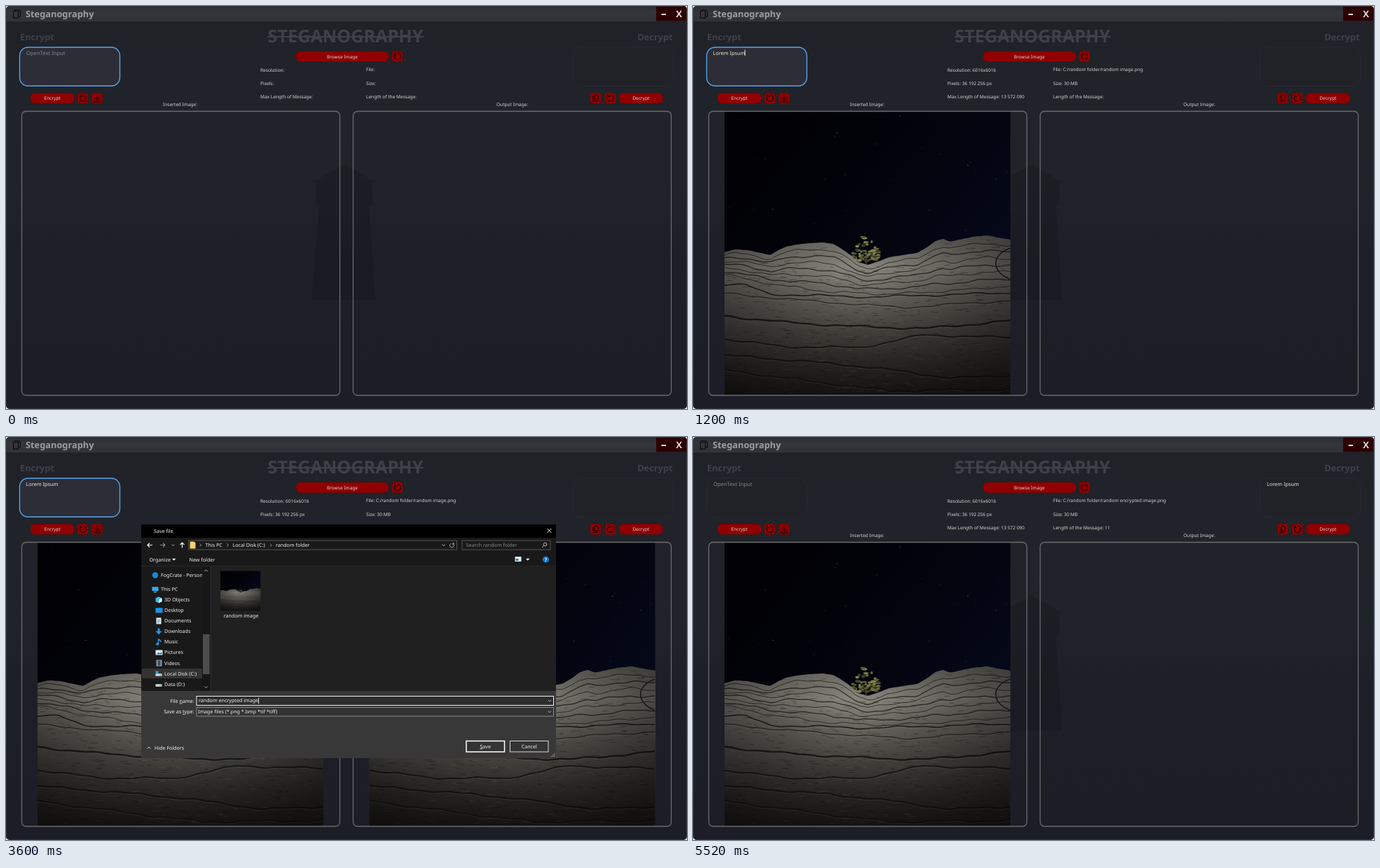
An HTML page that plays this animation: 972x576 px, repeating every 6 s.

```html
<!DOCTYPE html>
<html lang="en">
<head>
<meta charset="utf-8">
<title>Steganography</title>
<style>
  html, body { margin: 0; width: 100%; height: 100%; overflow: hidden; background: #fff; }
  svg { display: block; }
  text { font-family: "Noto Sans", "Open Sans", sans-serif; text-rendering: geometricPrecision; white-space: pre; }
</style>
</head>
<body>
<svg id="stage" xmlns="http://www.w3.org/2000/svg" width="972" height="576" viewBox="0 0 972 576"></svg>
<script>
const STEP = 1200, STEPS = 5;

let seed = 11;
const rnd = () => (seed = (seed * 16807) % 2147483647) / 2147483647;
const span = (a, b) => a + (b - a) * rnd();
const n1 = v => v.toFixed(1);

// ---- markup helpers ----
const rect = (x, y, w, h, fill, extra = '') =>
  `<rect x="${x}" y="${y}" width="${w}" height="${h}" fill="${fill}" ${extra}/>`;
const path = (d, stroke, w = 1, extra = '') =>
  `<path d="${d}" fill="none" stroke="${stroke}" stroke-width="${w}" ${extra}/>`;
const shape = (d, fill, extra = '') => `<path d="${d}" fill="${fill}" ${extra}/>`;
const text = (x, y, str, size, fill, extra = '') =>
  `<text x="${x}" y="${y}" font-size="${size}" fill="${fill}" ${extra}>${str}</text>`;
const bold = (x, y, str, size, fill, extra = '') =>
  text(x, y, str, size, fill, 'font-weight="700" ' + extra);
const at = (x, y, body) => `<g transform="translate(${x} ${y})">${body}</g>`;
const during = (steps, body) => `<g data-on="${steps}">${body}</g>`;
const grad = (id, stops, dir = 'x1="0" y1="0" x2="0" y2="1"') =>
  `<linearGradient id="${id}" ${dir}>` +
  stops.map(([o, c]) => `<stop offset="${o}" stop-color="${c}"/>`).join('') + '</linearGradient>';

// ---- night landscape ----
const ridge = [[45,352],[60,348],[78,349],[96,353],[110,356],[122,349],[133,344],[148,341],
  [165,339],[185,338],[200,340],[212,347],[225,356],[235,366],[250,370],[265,365],[280,359],
  [300,356],[320,353],[334,345],[346,336],[357,333],[367,337],[385,333],[400,330],[420,328],
  [440,332],[453,334]];
const floorLine = [[45,384],[75,390],[120,399],[200,409],[280,412],[370,407],[453,400]];

function height(points, x) {
  let i = 1;
  while (i < points.length - 1 && points[i][0] < x) i++;
  const [x0, y0] = points[i - 1], [x1, y1] = points[i];
  return y0 + (y1 - y0) * (x - x0) / (x1 - x0);
}

function trace(fn, step = 6) {
  let d = '';
  for (let x = 45; x <= 453; x += step) d += (d ? 'L' : 'M') + x + ' ' + n1(fn(x));
  return d;
}

function crack(fn, w, dark) {
  const d = trace(fn);
  return `<g transform="translate(0 2)">${path(d, '#aaa79c', 1, 'opacity=".13"')}</g>` +
    path(d, '#11110f', w, `opacity="${dark}"`);
}

function strata() {
  let out = '';
  [.14, .28, .42, .56, .7, .85, 1].forEach((u, i) => {
    out += crack(x => {
      const top = height(ridge, x), base = height(floorLine, x);
      return top + (base - top) * u + 1.3 * Math.sin(x / 13 + i * 2.1) + .7 * Math.sin(x / 5 + i);
    }, i % 2 ? 1.5 : 1, .65);
  });
  const deep = [
    [[45,398],[75,399],[110,412],[250,416],[453,410]],
    [[45,411],[160,421],[300,431],[453,421]],
    [[45,443],[130,452],[230,458],[330,461],[453,450]],
    [[45,476],[130,487],[240,488],[330,470],[453,474]],
    [[45,499],[150,507],[250,516],[370,532],[453,528]],
    [[45,520],[150,534],[280,550],[453,548]]
  ];
  deep.forEach((pts, i) => {
    out += crack(x => height(pts, x) + 1.2 * Math.sin(x / 17 + i * 1.7) + .6 * Math.sin(x / 6 + i),
      [1.6, 1, 2.4, 1.8, 2, 1.4][i], .8);
  });
  return out;
}

function grain(count, rise) {
  let d = '';
  for (let i = 0; i < count; i++) {
    const x = span(45, 445), top = height(ridge, x) + 5, y = span(top, 554);
    d += `M${n1(x)} ${n1(y)}l${n1(span(3, 12))} ${n1(span(-1, rise))}`;
  }
  return d;
}

function tree() {
  let out = path('M247 371V350', '#3a3722', 2);
  const tones = ['#3d4024', '#575a31', '#72733f', '#85854d'];
  for (let i = 0; i < 70; i++) {
    const v = Math.sqrt(rnd()), y = 327 + v * 37;
    const half = 3 + 16 * Math.sin(Math.min(1, v * 1.15) * 1.7);
    out += `<ellipse cx="${n1(247 + span(-half, half))}" cy="${n1(y)}" rx="${n1(span(1.5, 4))}" ry="${n1(span(1, 2.2))}" fill="${tones[i % 4]}"/>`;
  }
  return out;
}

function stars() {
  let out = '';
  for (let i = 0; i < 46; i++)
    out += `<circle cx="${n1(span(46, 452))}" cy="${n1(span(153, 325))}" r="${n1(span(.3, .7))}" fill="#9aa3bd" opacity="${n1(span(.2, .6))}"/>`;
  return out;
}

function photo() {
  const land = trace(x => height(ridge, x), 3) + 'L453 556H45Z';
  return rect(45, 151, 408, 405, 'url(#sky)') + stars() + tree() +
    shape(land, 'url(#rock)') +
    `<clipPath id="land"><path d="${land}"/></clipPath><g clip-path="url(#land)">` +
    path(grain(420, 1.6), '#0d0d0b', .8, 'opacity=".4"') +
    path(grain(260, 1.6), '#b5b2a6', .7, 'opacity=".16"') +
    strata() +
    path('M453 391Q428 380 433 362Q438 351 453 346', '#11110f', 1.6, 'opacity=".8"') +
    shape(land, 'url(#shade)') + '</g>';
}

// ---- application window ----
const RED = '#910000', SOFT = '#d9d7d5', DIM = '#3e404a';
const SMALL = 6.55;
const label = (x, y, str) => text(x, y + 2.4, str, SMALL, SOFT);
const pill = (x, y, w, h, str) =>
  rect(x, y, w, h, RED, 'rx="6.5" stroke="#7a0000" stroke-width=".6"') +
  text(x + w / 2, y + h / 2 + 2.4, str, SMALL, SOFT, 'text-anchor="middle"');
const icons = {
  reset: path('M4.6 4.2A4.6 4.6 0 1 0 8 2.9M4 2.2V5H7', '#160000', 1.2),
  save: path('M7.5 2.5V9.5M4.5 7L7.5 10L10.5 7M3 10.5V12.5H12V10.5', '#160000', 1.2),
  copy: path('M6 3.2H9.6L11.4 5V10H6ZM6 5H4V12.2H9.4V10', '#160000', 1.1)
};
const iconButton = (x, y, kind) =>
  at(x, y, rect(0, 0, 15, 15, RED, 'rx="3.5" stroke="#7a0000" stroke-width=".6"') + icons[kind]);
const panel = x => rect(x, 150.5, 454, 406, 'none', 'rx="6" stroke="#6b6b6c" stroke-width="1.3"');
const faintBox = x => rect(x, 58.5, 143, 56, '#202228', 'rx="12" stroke="#262930"');

function backdrop() {
  return rect(0, 0, 972, 576, 'url(#body)') +
    shape('M483 226L528 252H523V285H518L527 420H436L447 285H442V252H437Z', '#17181e', 'opacity=".45"') +
    rect(0, 0, 972, 21.5, 'url(#bar)') +
    path('M0 21.5H972', '#3b3c42', .8) +
    rect(928, 0, 44, 21.5, '#2b0102') +
    rect(935.5, 11, 6.5, 2, '#e8dcdc') +
    bold(960.5, 16, 'X', 13, '#e8dcdc', 'text-anchor="middle"') +
    path('M12.5 7.5V5.5H18L20.5 8V15H18M10.5 7.5H17.5V17.2H10.5Z', '#0b0b0d', 1.2) +
    bold(28, 15.7, 'Steganography', 12.8, '#9c9da3');
}

function controls() {
  return bold(20, 48.5, 'Encrypt', 12.8, DIM) +
    bold(951.5, 48.5, 'Decrypt', 12.8, DIM, 'text-anchor="end"') +
    bold(484.5, 52.4, 'STEGANOGRAPHY', 25.2, DIM, 'text-anchor="middle"') +
    rect(373, 43, 223, 2, DIM) +
    pill(414, 65, 132, 14.5, 'Browse Image') + iconButton(551, 64.5, 'reset') +
    pill(35, 124.5, 62.5, 14.5, 'Encrypt') + iconButton(102, 124.3, 'reset') + iconButton(122.5, 124.3, 'save') +
    iconButton(834, 124.3, 'copy') + iconButton(855, 124.3, 'reset') + pill(875, 124.5, 62.5, 14.5, 'Decrypt') +
    label(224, 140.7, 'Inserted Image:') + label(700, 140.7, 'Output Image:');
}

function details() {
  const rows = [
    [363, 92, 'Resolution:', '6016x6016'], [363, 111, 'Pixels:', '36 192 256 px'],
    [363, 130, 'Max Length of Message:', '13 572 090'], [514, 111, 'Size:', '30 MB']
  ];
  const file = name => label(514, 91, `File: C:/random folder/${name}.png`);
  const count = 'Length of the Message:';
  return rows.map(([x, y, k, v]) =>
      during('0', label(x, y, k)) + during('1234', label(x, y, k + ' ' + v))).join('') +
    during('0', label(514, 91, 'File:')) +
    during('123', file('random image')) + during('4', file('random encrypted image')) +
    during('01', label(514, 130, count)) + during('234', label(514, 130, count + ' 11'));
}

function inputs() {
  const hint = text(29, 69.5, 'OpenText Input', 7.6, '#85858b');
  const lorem = x => text(x, 69.5, 'Lorem Ipsum', 7.3, '#efe9d6');
  return during('4', faintBox(19.5)) + faintBox(809.5) +
    during('0123', rect(19.5, 59, 143, 55.3, '#2c2d37', 'rx="12" stroke="#58a2ea" stroke-width="1.4"')) +
    during('04', hint) + during('123', lorem(28.5)) +
    during('1', rect(73.7, 62.5, .9, 8.5, '#fff')) + during('4', lorem(819));
}

// ---- save dialog ----
const WHITE = '#f2f2f2', UI = 7.15;
const ui = (x, y, str, extra = '', fill = WHITE) => text(x, y + 2.6, str, UI, fill, extra);
const chevron = (x, y, s = 2.2, c = '#c4c4c4', flip = 1) =>
  path(`M${x - s} ${y - flip * s / 2}L${x} ${y + flip * s / 2}L${x + s} ${y - flip * s / 2}`, c, .9);
const caretRight = (x, y) => path(`M${x - 1} ${y - 2}l2 2l-2 2`, '#c4c4c4', .8);
const key = (str, i) =>
  `${str.slice(0, i)}<tspan text-decoration="underline">${str[i]}</tspan>${str.slice(i + 1)}`;

function folderTree() {
  const disk = rect(0, 4.5, 9, 3.5, '#d5d9dc') + rect(6, 5.8, 2, 1, '#2aa84a');
  const marks = [
    rect(0, 1, 9, 6, '#38a8ee') + rect(2.5, 8, 4, 1, '#9cc9e6'),
    shape('M4.5 0L9 2V7L4.5 9L0 7V2Z', '#42b9ea') + shape('M4.5 4L9 2V7L4.5 9Z', '#dff3fb'),
    rect(0, 1, 10, 7, '#1595ef'),
    rect(1, 0, 7, 9, '#e8edf1') + path('M2.5 3H6.5M2.5 5H6.5M2.5 7H5', '#3784c4', .9),
    shape('M3 0H6V4H9L4.5 9L0 4H3Z', '#2b91e8'),
    path('M4 7.5V.8Q7 1.5 7.5 4.5', '#2b9af0', 1.4) + '<circle cx="2.7" cy="7.4" r="1.9" fill="#2b9af0"/>',
    rect(0, 1, 10, 7, '#e5eef3') + shape('M1 7L4 4L6 5.5L9 3.5V7Z', '#3582b4'),
    rect(1, 0, 8, 9, '#8f9dad') + rect(3, 1, 4, 7, '#334a72'),
    rect(0, 1, 4, 3, '#37a5ec') + disk,
    disk
  ];
  const names = ['This PC', '3D Objects', 'Desktop', 'Documents', 'Downloads', 'Music', 'Pictures',
    'Videos', 'Local Disk (C:)', 'Data (D:)'];
  return rect(194, 331, 86, 14, '#333') +
    '<circle cx="213" cy="197.5" r="4.2" fill="#168bdc"/>' +
    `<g clip-path="url(#side)">${ui(221, 197.5, 'FogCrate - Personal')}</g>` +
    names.map((name, i) => {
      const y = 217.5 + i * 15.06, inset = i ? 5 : 0;
      return at(208.5 + inset, y - 4.3, marks[i]) + ui(221 + inset, y, name);
    }).join('');
}

function dialog() {
  const line = '#5a5a5a';
  return rect(193, 125, 592, 334, '#191919') + rect(193, 125, 592, 19, '#000') +
    ui(211, 134, 'Save file') + path('M772.5 130.8l6 6m0-6l-6 6', WHITE, 1) +
    // address row
    path('M209 154.5H202M205 151.5L202 154.5L205 157.5', WHITE, 1.2) +
    path('M220 154.5H227M224 151.5L227 154.5L224 157.5', '#8a8a8a', 1.1) +
    chevron(238.5, 154.5, 1.8) +
    path('M251.5 158.5V151M248.5 154L251.5 151L254.5 154', WHITE, 1.2) +
    rect(260.5, 148, 383, 13, '#191919', `stroke="${line}" stroke-width=".9"`) +
    shape('M262.5 149.5H268L270.5 151V159.5H262.5Z', '#f4d071') +
    caretRight(277.5, 154.5) + ui(284.5, 154.3, 'This PC') + caretRight(316.5, 154.5) +
    ui(323.5, 154.3, 'Local Disk (C:)') + caretRight(378, 154.5) + ui(385, 154.3, 'random folder') +
    chevron(624.5, 154.5) + path('M634.6 152.4A3 3 0 1 0 638 152.2M638.8 150.8V153H636.5', '#c4c4c4', .9) +
    rect(651, 148, 126, 13, '#191919', `stroke="${line}" stroke-width=".9"`) +
    ui(656.5, 154.3, 'Search random folder', '', '#888') +
    '<circle cx="769.5" cy="153.5" r="2.3" fill="none" stroke="#c4c4c4" stroke-width=".9"/>' +
    path('M767.8 155.2L765 158', '#c4c4c4', .9) +
    // command row
    ui(204.5, 175, 'Organize') + shape('M237 173.7H242.5L239.7 176.7Z', WHITE) + ui(261.5, 175, 'New folder') +
    rect(726.5, 171, 9, 7, '#e3eef4') + rect(727.5, 174, 4, 3, '#3582b4') +
    shape('M742 173.7H747.5L744.7 176.7Z', WHITE) +
    '<circle cx="770.5" cy="175" r="4.6" fill="#0b78d0"/>' +
    bold(770.5, 177.7, '?', 7.2, '#fff', 'text-anchor="middle"') +
    path('M193 184.5H785', '#2b2b2b', .8) +
    // browser area
    rect(293, 185, 492, 178, '#202020') + folderTree() +
    rect(280.5, 185, 10.5, 178, '#171717') + rect(281, 282, 9.5, 57, '#4d4d4d') +
    chevron(285.5, 191, 2.2, '#c4c4c4', -1) + chevron(285.5, 357.5) +
    path('M292.5 185V363', '#303030', 1) +
    '<use href="#photo" transform="translate(299.7 170.4) scale(.14)"/>' +
    ui(335.5, 255, 'random image', 'text-anchor="middle"') +
    // footer
    rect(193, 363, 592, 96, '#383838') +
    ui(268.5, 377, key('File name:', 5), 'text-anchor="end"') +
    rect(272, 370.5, 509.5, 13, '#2d2d2d', 'stroke="#f0f0f0" stroke-width="1"') +
    ui(275, 376.7, 'random encrypted image') + rect(360, 372.7, .8, 8.6, '#fff') + chevron(776, 377) +
    ui(268.5, 392.7, key('Save as type:', 8), 'text-anchor="end"') +
    rect(272, 386.5, 509.5, 12.5, '#333', 'stroke="#929292" stroke-width=".9"') +
    ui(274, 392.7, 'Image files (*.png *.bmp *tif *tiff)') + chevron(776, 392.8) +
    chevron(204, 444.3, 2.4, WHITE, -1) + ui(212, 444, 'Hide Folders') +
    rect(657, 434.5, 54.5, 15.5, '#333', 'stroke="#fff" stroke-width="1.5"') +
    ui(684.2, 442, key('Save', 0), 'text-anchor="middle"') +
    rect(719.5, 434.5, 54.5, 15.5, '#333', 'stroke="#d6d6d6" stroke-width="1"') +
    ui(746.8, 442, 'Cancel', 'text-anchor="middle"') +
    path('M778 456.5h1.2m.8 0h1.2m.8 0h1.2M780 454.5h1.2m.8 0h1.2M782 452.5h1.2', '#b0b0b0', 1.1);
}

const defs = '<defs>' +
  grad('body', [[0, '#1f2127'], [.18, '#202329'], [.42, '#20242a'], [.62, '#1d1f27'], [1, '#1c1d26']]) +
  grad('bar', [[0, '#2d2e33'], [.5, '#35363b'], [1, '#303136']]) +
  grad('sky', [[0, '#010103'], [.45, '#02030b'], [.8, '#050818'], [1, '#040715']], 'x1="0" y1="0" x2="1" y2=".8"') +
  grad('rock', [[0, '#6d6b64'], [.2, '#85827a'], [.36, '#6b6962'], [.55, '#504e48'], [.76, '#36342f'], [1, '#1c1b18']]) +
  '<radialGradient id="shade" gradientUnits="userSpaceOnUse" cx="235" cy="385" r="245">' +
  '<stop offset=".1" stop-opacity="0"/><stop offset="1" stop-opacity=".5"/></radialGradient>' +
  '<clipPath id="frame"><rect width="972" height="576" rx="5"/></clipPath>' +
  '<clipPath id="side"><rect x="193" y="185" width="87" height="178"/></clipPath>' +
  `<g id="photo">${photo()}</g></defs>`;

const stage = document.getElementById('stage');
stage.innerHTML = defs + '<g clip-path="url(#frame)">' + backdrop() +
  during('1234', '<use href="#photo"/>') + during('23', '<use href="#photo" x="473.5"/>') +
  panel(22.5) + panel(495.5) + controls() + inputs() + details() +
  during('3', dialog()) +
  rect(.5, .5, 971, 575, 'none', 'rx="5" stroke="#34353b" stroke-width=".8"') + '</g>';

// ---- playback ----
const parts = [...stage.querySelectorAll('[data-on]')];
const start = performance.now();
let shown = -1;
function play() {
  const step = Math.floor(Math.max(0, performance.now() - start) / STEP) % STEPS;
  if (step !== shown) {
    shown = step;
    for (const p of parts) p.style.display = p.dataset.on.includes(step) ? '' : 'none';
  }
  requestAnimationFrame(play);
}
play();
</script>
</body>
</html>
```
